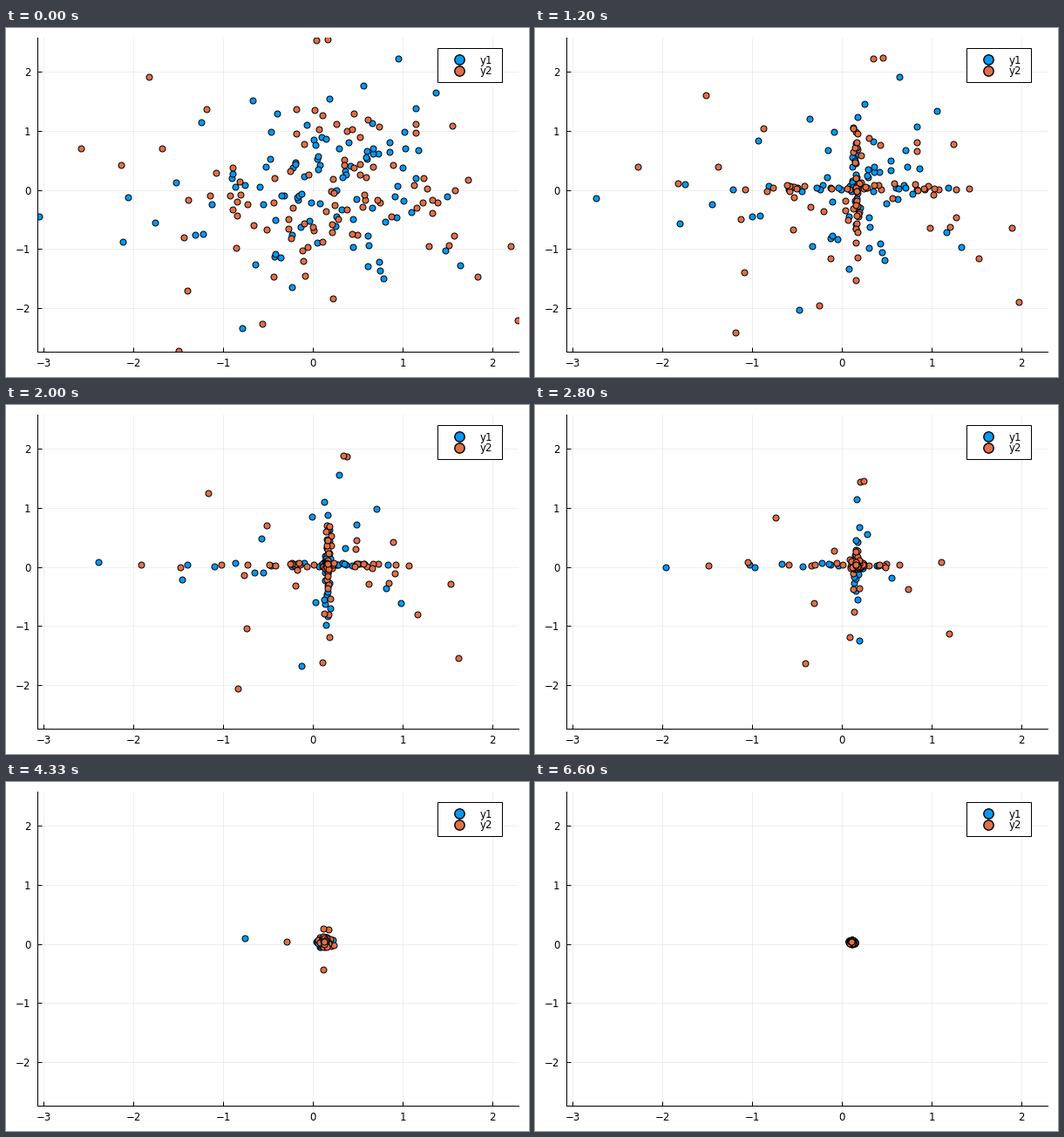
A matplotlib script for the animation above (6670 ms loop, 600x400 px).

```python
import numpy as np
import matplotlib.pyplot as plt
from matplotlib.animation import FuncAnimation
from matplotlib.patches import Rectangle

W, H, DPI = 600, 400, 100
FRAMES, LOOP = 100, 6670
PX = 72 / DPI  # points per pixel
BLUE, ORANGE = "#009AFA", "#E26F46"

plt.rcParams["font.family"] = "DejaVu Sans"
plt.rcParams["font.size"] = 8.5
rng = np.random.default_rng(12)


class Swarm:
    """Normal samples that close in on the centre at equal speed along each axis."""

    def __init__(self, extremes, count=100):
        cloud = rng.normal((.1, 0), (.85, .85), (4 * count, 2))
        cloud = cloud[np.hypot(*cloud.T) < 1.95]
        self.start = np.vstack([extremes, cloud])[:count]
        self.swing = rng.triangular(-1, 0, 1, (count, 2))
        self.phase = rng.uniform(0, 2 * np.pi, (count, 2))

    def at(self, n):
        # Speed grows steadily, then stays level.
        m = min(n, 60)
        reach = .0099 * m + .000407 * m * m + .0575 * (n - m)
        size = np.interp(n, [0, 42, 84, 99], [.07, .1, .12, .04])
        goal = size * self.swing * np.sin(.9 * n + self.phase)
        goal += np.interp(n, [42, 78], [.16, .11]), .035
        # High points drift to the right before they come down.
        height = self.start[:, 1] - reach
        goal[:, 0] += .28 * np.clip(height - 1.2, 0, None)
        return self.start + np.clip(goal - self.start, -reach, reach)


# The outermost samples fix the outline of each cloud.
swarms = [
    Swarm([(-3.05, -.45), (-2.12, -.88), (-2.06, -.12), (-.79, -2.34),
           (.95, 2.23), (1.37, 1.65), (1.64, -1.27)]),
    Swarm([(-2.58, .7), (-2.14, .43), (-1.83, 1.92), (-1.5, -2.72),
           (-1.4, -1.7), (-.56, -2.27), (.04, 2.53), (.16, 2.55),
           (1.83, -1.46), (2.2, -.95), (2.28, -2.21)]),
]

fig = plt.figure(figsize=(W / DPI, H / DPI), dpi=DPI, facecolor="white")

left, right, top, bottom = 36.4, 588, 11, 371
ax = fig.add_axes([left / W, 1 - bottom / H, (right - left) / W, (bottom - top) / H])
ax.set_xlim((left - 352.1) / 103, (right - 352.1) / 103)
ax.set_ylim((185.7 - bottom) / 67.75, (185.7 - top) / 67.75)
ax.set_xticks(range(-3, 3))
ax.set_yticks(range(-2, 3))
ax.set_axisbelow(True)
ax.grid(color="black", alpha=.085, linewidth=.7 * PX)
ax.tick_params(direction="in", length=5 * PX, width=PX)
ax.tick_params(axis="x", pad=7 * PX)
ax.tick_params(axis="y", pad=8 * PX)
for side, spine in ax.spines.items():
    spine.set_visible(side in ("left", "bottom"))
    spine.set_linewidth(PX)


def dots(axes, color, size, edge, xy=((), ())):
    return axes.plot(*xy, "o", ms=size * PX, mfc=color, mec="black", mew=edge * PX)[0]


marks = [dots(ax, color, 7, 1) for color in (BLUE, ORANGE)]

# Legend, laid out in pixels
key = fig.add_axes([0, 0, 1, 1], zorder=5)
key.set_xlim(0, W)
key.set_ylim(H, 0)
key.axis("off")
key.add_patch(Rectangle((495.2, 23.2), 74, 39, fc="white", ec="black", lw=PX))
for y, color, name in ((36.4, BLUE, "y1"), (49.2, ORANGE, "y2")):
    dots(key, color, 11.3, 1.4, ([519.7], [y]))
    key.text(544, y + 4.2, name, va="baseline")


def draw(n):
    for mark, swarm in zip(marks, swarms):
        mark.set_data(*swarm.at(n).T)
    return marks


anim = FuncAnimation(fig, draw, frames=FRAMES, interval=LOOP / FRAMES,
                     repeat=True, repeat_delay=0)
plt.show()
```
